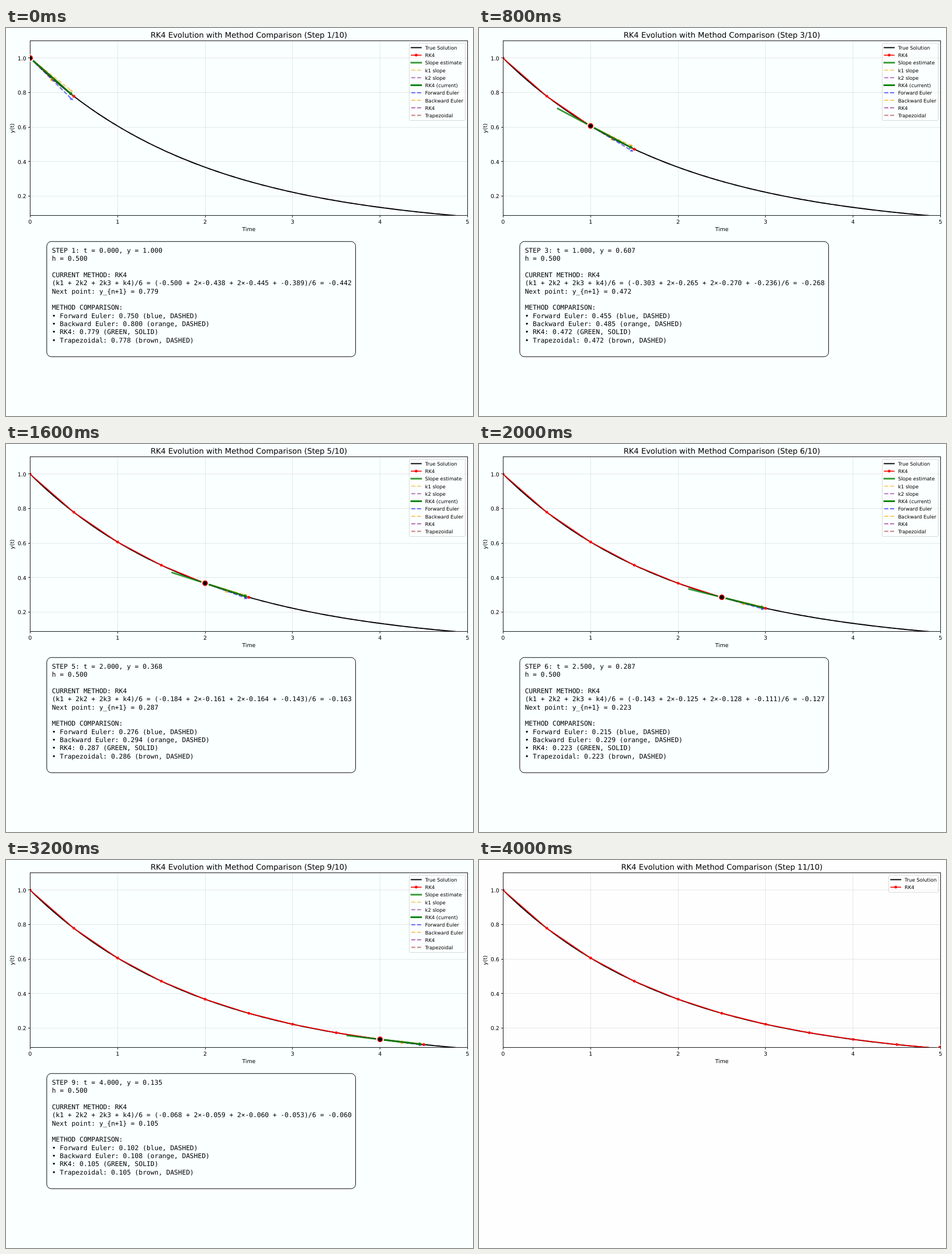
Write an HTML page that moves like this. It is 821 px wide and 682 px high and loops after 4400 ms.

```html
<!DOCTYPE html>
<html lang="en">
<head>
<meta charset="utf-8">
<title>RK4 Evolution</title>
<style>
  html, body { margin: 0; width: 100%; height: 100%; overflow: hidden; background: #faffff; }
  svg { display: block; width: 821px; height: 682px; }
  text { font-family: "DejaVu Sans", sans-serif; text-rendering: geometricPrecision; fill: #000; }
  .mono { font-family: "DejaVu Sans Mono", monospace; font-size: 11.53px; }
</style>
</head>
<body>
<svg id="stage" viewBox="0 0 821 682" xmlns="http://www.w3.org/2000/svg"></svg>
<script>
const stage = document.getElementById("stage");
const STEP_MS = 400, STEPS = 11, H = 0.5;
const PT = 0.961; // pixels per point
const LEFT = 42.5, RIGHT = 811.5, TOP = 22.5, BOTTOM = 329.2;
const X = t => 42.4 + 153.8 * t;
const Y = y => 52.8 + 303.6 * (1 - y);
const slope = y => -0.5 * y;
const f3 = v => v.toFixed(3);

const el = (name, attrs, body = "") =>
  `<${name} ${Object.entries(attrs).map(([k, v]) => `${k}="${v}"`).join(" ")}>${body}</${name}>`;
const label = (str, x, y, size, anchor = "start", more = {}) =>
  el("text", { x, y, "font-size": size, "text-anchor": anchor, ...more }, str);
const dot = (x, y, r, fill, more = {}) => el("circle", { cx: x, cy: y, r, fill, ...more });

function path(points, color, width, more = {}) {
  const d = "M" + points.map(p => p.map(v => v.toFixed(2)).join(" ")).join("L");
  return el("path", { d, fill: "none", stroke: color, "stroke-width": width * PT, ...more });
}
const dashes = width => `${3.7 * width * PT} ${1.6 * width * PT}`;
const dashed = { "stroke-dasharray": dashes(2), "stroke-opacity": 0.6 };
const solid = { "stroke-linecap": "square", "stroke-linejoin": "round" };

// Open-headed arrow, pulled back a little at both ends
function arrow(a, b, color, width, more) {
  const dx = b[0] - a[0], dy = b[1] - a[1], len = Math.hypot(dx, dy);
  const ux = dx / len, uy = dy / len;
  const at = (s, side) => [a[0] + ux * s - uy * side, a[1] + uy * s + ux * side];
  const tip = len - 2 * PT - 1.12 * width * PT;
  return path([at(2 * PT, 0), at(tip, 0)], color, width, more) +
    path([at(tip - 3.84, 1.92), at(tip, 0), at(tip - 3.84, -1.92)], color, width,
      { ...more, "stroke-miterlimit": 10 });
}

function solve() {
  const rows = [];
  let y = 1;
  for (let n = 0; n < STEPS; n++) {
    const k1 = slope(y), k2 = slope(y + H / 2 * k1);
    const k3 = slope(y + H / 2 * k2), k4 = slope(y + H * k3);
    const k = (k1 + 2 * k2 + 2 * k3 + k4) / 6;
    rows.push({ t: n * H, y, k1, k2, k3, k4, k, next: y + H * k,
      forward: y * 0.75, backward: y / 1.25, trapezoid: y * 0.875 / 1.125 });
    y += H * k;
  }
  return rows;
}
const rows = solve();

const curve = Array.from({ length: 201 }, (_, i) => [X(i / 40), Y(Math.exp(-i / 80))]);

function grid() {
  let s = "";
  for (let t = 1; t < 5; t++) {
    const x = Math.floor(X(t)) + 0.5;
    s += path([[x, TOP], [x, BOTTOM]], "#b0b0b0", 1 / PT, { "stroke-opacity": 0.3 });
  }
  for (let i = 1; i <= 5; i++) {
    const y = Math.floor(Y(i / 5)) + 0.5;
    s += path([[LEFT, y], [RIGHT, y]], "#b0b0b0", 1 / PT, { "stroke-opacity": 0.3 });
  }
  return s;
}

function axes() {
  let s = el("rect", { x: LEFT, y: TOP, width: RIGHT - LEFT, height: 307,
    fill: "none", stroke: "#000", "stroke-width": 0.9 });
  for (let t = 0; t <= 5; t++) {
    const x = Math.floor(X(t)) + 0.5;
    s += path([[x, 329.5], [x, 333]], "#000", 0.9) + label(t, X(t), 343.5, 9.61, "middle");
  }
  for (let i = 1; i <= 5; i++) {
    const y = Math.floor(Y(i / 5)) + 0.5;
    s += path([[39, y], [LEFT, y]], "#000", 0.9) +
      label((i / 5).toFixed(1), 35.7, Y(i / 5) + 3.7, 9.61, "end");
  }
  return s + label("Time", 427, 357.4, 9.61, "middle") +
    label("y(t)", 0, 0, 9.61, "middle", { transform: "translate(14.2 176.3) rotate(-90)" });
}

const KEYS = [
  ["True Solution", "#000", 2, solid],
  ["RK4", "#f00", 1.7, solid],
  ["Slope estimate", "green", 3, { ...solid, "stroke-opacity": 0.8 }],
  ["k1 slope", "orange", 2, dashed],
  ["k2 slope", "purple", 2, dashed],
  ["RK4 (current)", "green", 3, solid],
  ["Forward Euler", "blue", 2, dashed],
  ["Backward Euler", "orange", 2, dashed],
  ["RK4", "purple", 2, dashed],
  ["Trapezoidal", "brown", 2, dashed]
];

function legend(count) {
  const left = count > 2 ? 709 : 720.5, x = left + 3.5;
  let s = el("rect", { x: left, y: 27, width: 807.4 - left, height: count * 13.22 + 3.3, rx: 1.7,
    fill: "#fff", "fill-opacity": 0.4, stroke: "#ccc", "stroke-opacity": 0.8, "stroke-width": 0.96 });
  KEYS.slice(0, count).forEach(([name, color, width, more], i) => {
    const y = 34.5 + 13.22 * i;
    s += path([[x, y], [x + 17.3, y]], color, width, more);
    if (i === 1) s += dot(x + 8.65, y, 2.4, "#f00");
    s += label(name, x + 24.2, y + 3.5, 8.65);
  });
  return s;
}

function estimates(r) {
  const p = (dt, y) => [X(r.t + dt), Y(y)];
  const here = p(0, r.y), mid = H / 2, reach = 0.75 * H;
  let s = path([p(-reach, r.y - reach * r.k), p(reach, r.y + reach * r.k)], "green", 3,
    { ...solid, "stroke-opacity": 0.8 });
  s += path([here, p(mid, r.y + mid * r.k1)], "orange", 2, dashed);
  s += path([here, p(mid, r.y + mid * r.k2)], "purple", 2, dashed);
  s += dot(...p(mid, r.y + mid * r.k1), 2.9, "orange", { "fill-opacity": 0.8 });
  // Arrows whose tip falls below the axes are not shown
  if (Y(r.next) < BOTTOM) {
    s += arrow(here, p(H, r.forward), "blue", 2, dashed);
    s += arrow(here, p(H, r.backward), "orange", 2, dashed);
    s += arrow(here, p(H, r.trapezoid), "brown", 2, dashed);
    s += arrow(here, p(H, r.next), "green", 3, { "stroke-opacity": 0.8 });
  }
  return s + dot(...p(H, r.next), 2.5, "#f00");
}

function report(r, n) {
  const lines = [
    `STEP ${n + 1}: t = ${f3(r.t)}, y = ${f3(r.y)}`,
    `h = ${f3(H)}`,
    "",
    "CURRENT METHOD: RK4",
    `(k1 + 2k2 + 2k3 + k4)/6 = (${f3(r.k1)} + 2×${f3(r.k2)} + 2×${f3(r.k3)} + ${f3(r.k4)})/6 = ${f3(r.k)}`,
    `Next point: y_{n+1} = ${f3(r.next)}`,
    "",
    "METHOD COMPARISON:",
    `• Forward Euler: ${f3(r.forward)} (blue, DASHED)`,
    `• Backward Euler: ${f3(r.backward)} (orange, DASHED)`,
    `• RK4: ${f3(r.next)} (GREEN, SOLID)`,
    `• Trapezoidal: ${f3(r.trapezoid)} (brown, DASHED)`
  ];
  return el("rect", { x: 71.7, y: 375.3, width: 542.9, height: 202.5, rx: 8,
    fill: "none", stroke: "#000", "stroke-width": 0.96 }) +
    lines.map((line, i) => el("text", { class: "mono", x: 80.7, y: 394.8 + 14.36 * i }, line)).join("");
}

function draw(n) {
  const r = rows[n], last = n === STEPS - 1;
  const trail = rows.slice(0, n + 1).map(q => [X(q.t), Y(q.y)]);
  const [cx, cy] = trail[n];
  const clip = body => el("g", { "clip-path": "url(#plot)" }, body);
  let marks = path(curve, "#000", 2, solid);
  if (n) marks += path(trail, "#f00", 1.7, solid);
  marks += trail.map(p => dot(...p, 2.4, "#f00")).join("");
  if (!last) marks += estimates(r);
  let current = dot(cx, cy, 5.9, "#f00", { stroke: "#fff", "stroke-width": 1.92 });
  if (!last) current += dot(cx, cy, 3.4, "#000");

  stage.innerHTML =
    el("clipPath", { id: "plot" }, el("rect",
      { x: LEFT - 0.1, y: TOP - 0.1, width: RIGHT - LEFT, height: BOTTOM - TOP + 0.2 })) +
    el("rect", { width: 821, height: 682, fill: last ? "#fefefe" : "#faffff" }) +
    clip(grid() + marks) + axes() + clip(current) + legend(last ? 2 : KEYS.length) +
    label(`RK4 Evolution with Method Comparison (Step ${n + 1}/10)`, 427, 17.3, 13.45, "middle") +
    (last ? "" : report(r, n));
}

let shown = -1;
function tick() {
  const n = Math.floor(performance.now() / STEP_MS) % STEPS;
  if (n !== shown) draw(shown = n);
  requestAnimationFrame(tick);
}
tick();
</script>
</body>
</html>
```
